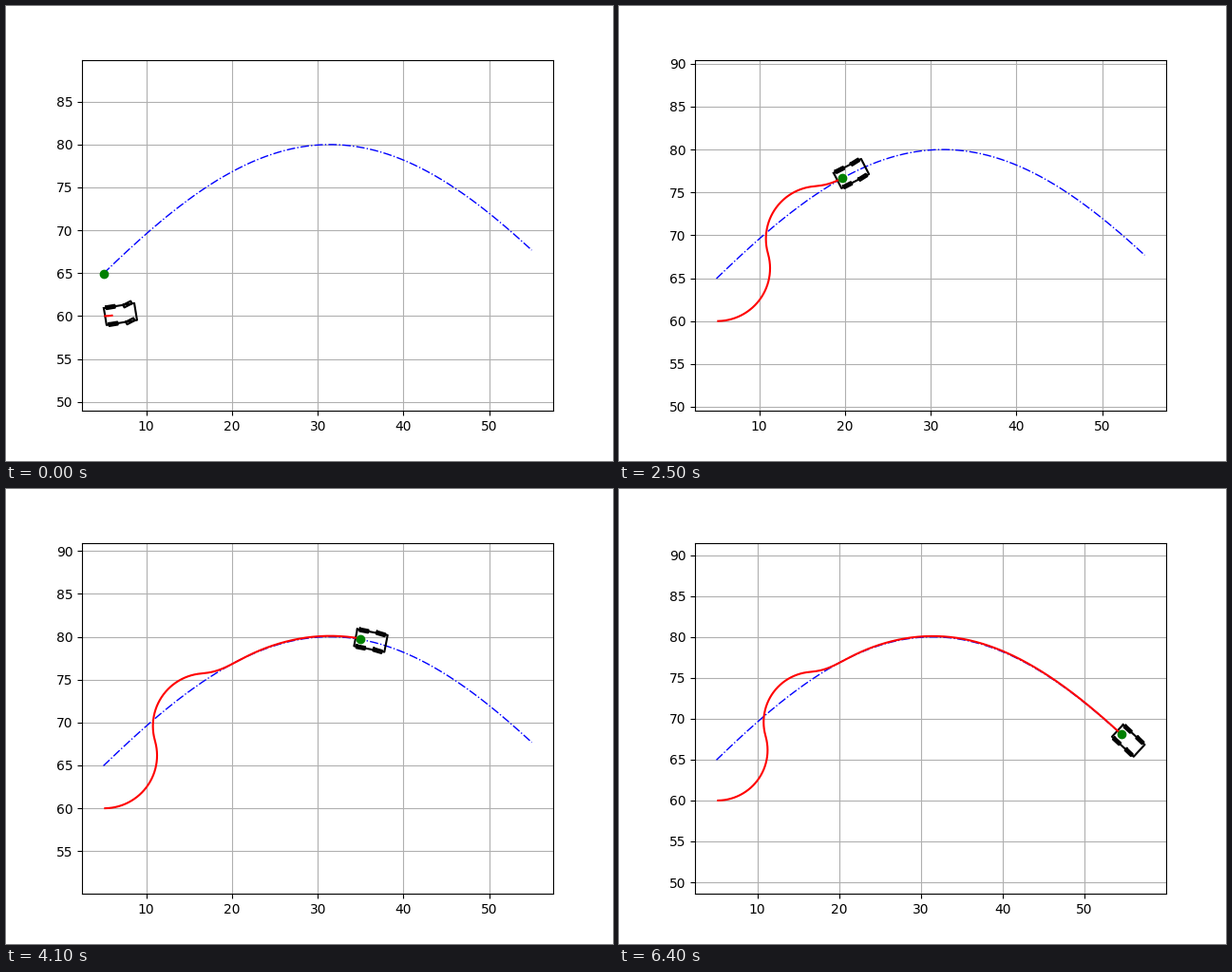
A matplotlib script that plays this animation: 639 by 479 pixels, repeating every 6.5 s.

```python
import numpy as np
import matplotlib.pyplot as plt
from matplotlib.animation import FuncAnimation

WIDTH, HEIGHT, DPI = 639, 479, 100
FRAMES, INTERVAL = 65, 100
STEPS_PER_FRAME = 5

# Vehicle geometry, measured from the rear axle
WHEELBASE = 2.0
BODY_FRONT, BODY_BACK, BODY_HALF = 2.8, 0.8, 1.0
WHEEL_RADIUS, WHEEL_HALF = 0.5, 1 / 6
MAX_STEER = np.pi / 10

# Motion and feedback
SPEED, DT = 2.0, 0.1
GAIN_OFFSET, GAIN_YAW = 1.1, 2.15

path_x = 5 + 0.05 * np.arange(1000)
path_y = 60 + 20 * np.sin(path_x / 20)
path_yaw = np.arctan(np.cos(path_x / 20))


def steer_towards_path(x, y, yaw):
    """Return the steering angle and the nearest path index."""
    i = np.argmin((path_x - x) ** 2 + (path_y - y) ** 2)
    dx, dy = x - path_x[i], y - path_y[i]
    offset = dy * np.cos(path_yaw[i]) - dx * np.sin(path_yaw[i])
    steer = -GAIN_OFFSET * offset - GAIN_YAW * (yaw - path_yaw[i])
    return np.clip(steer, -MAX_STEER, MAX_STEER), i


def simulate(steps):
    x, y, yaw = 5.0, 60.0, 0.0
    log = []
    for _ in range(steps):
        steer, nearest = steer_towards_path(x, y, yaw)
        x += SPEED * np.cos(yaw) * DT
        y += SPEED * np.sin(yaw) * DT
        yaw += SPEED / WHEELBASE * np.tan(steer) * DT
        log.append((x, y, yaw, steer, nearest))
    return np.array(log)


def box(back, front, half):
    return np.array([[-back, front, front, -back, -back],
                     [half, half, -half, -half, half]])


def rotate(points, angle):
    c, s = np.cos(angle), np.sin(angle)
    return np.array([[c, -s], [s, c]]) @ points


def draw_car(x, y, yaw, steer):
    parts = [box(BODY_BACK, BODY_FRONT, BODY_HALF)]
    wheel = box(WHEEL_RADIUS, WHEEL_RADIUS, WHEEL_HALF)
    for along, angle in ((0, 0), (WHEELBASE, steer)):
        for side in (-BODY_HALF, BODY_HALF):
            parts.append(rotate(wheel, angle) + [[along], [side]])
    for part in parts:
        px, py = rotate(part, yaw) + [[x], [y]]
        ax.plot(px, py, color="black")


def draw(frame):
    trail = states[:(frame + 1) * STEPS_PER_FRAME]
    x, y, yaw, steer, nearest = trail[-1]
    target = int(nearest)
    ax.cla()
    ax.plot(path_x, path_y, "-.b", linewidth=1.0)
    draw_car(x, y, yaw, steer)
    ax.plot(trail[:, 0], trail[:, 1], "-r")
    ax.plot(path_x[target], path_y[target], "go")
    ax.axis("equal")
    ax.grid(True)
    return []


states = simulate(FRAMES * STEPS_PER_FRAME)

# The tiny margin keeps the pixel size from being truncated
fig = plt.figure(figsize=((WIDTH + 1e-6) / DPI, (HEIGHT + 1e-6) / DPI), dpi=DPI)
ax = fig.add_axes([80 / WIDTH, 52.8 / HEIGHT, 496 / WIDTH, 369.6 / HEIGHT])

anim = FuncAnimation(fig, draw, frames=FRAMES, init_func=lambda: draw(0),
                     interval=INTERVAL, repeat=True, repeat_delay=0,
                     cache_frame_data=False)
plt.show()
```
